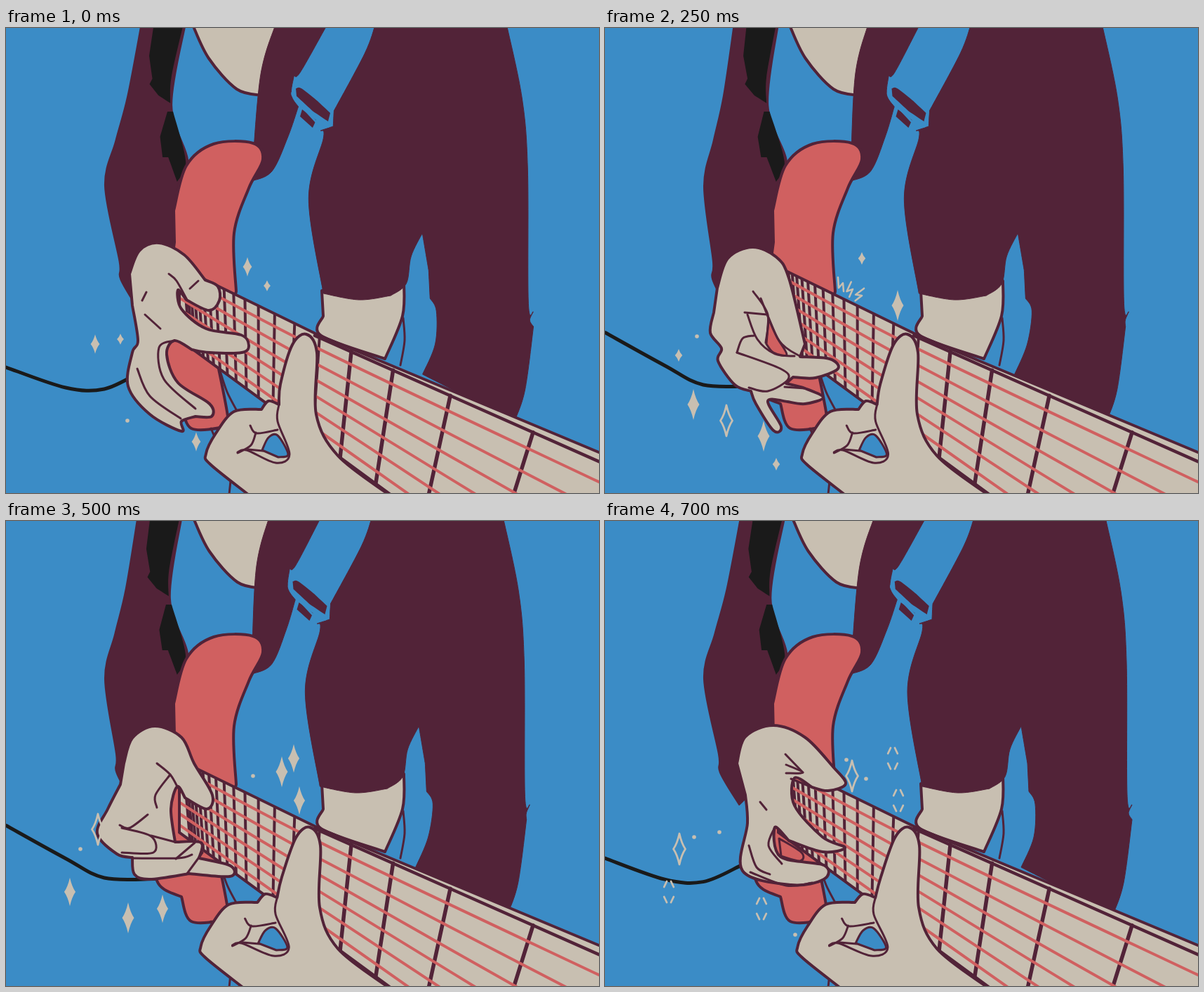
These frames come from a looping animation (845 px wide and 662 px high, 0.75 s). An HTML page with a canvas:

```html
<!DOCTYPE html>
<html lang="en">
<head>
<meta charset="utf-8">
<title>Guitar player</title>
<style>
html, body { margin: 0; width: 100%; height: 100%; overflow: hidden; background: #3b8cc6; }
canvas { display: block; }
</style>
</head>
<body>
<canvas id="stage" width="845" height="662"></canvas>
<script>
const ctx = document.getElementById('stage').getContext('2d');
const BLUE = '#3b8cc6', PLUM = '#522338', SKIN = '#c8bfb1', RED = '#d06060', INK = '#1a1a1a';
const STEP = 50, STEPS = 15;
let step = 0;

// One slow swing per loop around a middle value, highest at the given step
const wave = (mid, amp, peak = 0) => mid + amp * Math.cos((step - peak) / STEPS * 2 * Math.PI);
const points = s => s.trim().split(/\s+/).map(p => p.split(',').map(Number));

// Smooth curve through points; "/" makes the point before it a corner.
function curve(text, move = (x, y) => [x, y]) {
  const path = new Path2D();
  let last = null;
  for (const part of text.split('/')) {
    const run = points(part).map(p => move(...p));
    if (last) run.unshift(last);
    else path.moveTo(...run[0]);
    for (let i = 0; i < run.length - 1; i++) {
      const b = run[i], c = run[i + 1], a = run[i - 1] || b, d = run[i + 2] || c;
      path.bezierCurveTo(
        b[0] + (c[0] - a[0]) / 6, b[1] + (c[1] - a[1]) / 6,
        c[0] - (d[0] - b[0]) / 6, c[1] - (d[1] - b[1]) / 6, c[0], c[1]);
    }
    last = run[run.length - 1];
  }
  return path;
}
function line(text, width = 3, color = PLUM, move) {
  ctx.strokeStyle = color;
  ctx.lineWidth = width;
  ctx.stroke(curve(text, move));
}
function shape(text, fill, width = 0, move) {
  const path = curve(text, move);
  path.closePath();
  ctx.fillStyle = fill;
  ctx.fill(path);
  if (!width) return;
  ctx.strokeStyle = PLUM;
  ctx.lineWidth = width;
  ctx.stroke(path);
}

// Strumming hand poses: first step, outline, creases and gap between the fingers
const POSES = [
  { from: 0,
    out: '176,350 190,317 218,306 254,323 284,359 / 302,368 304,388 289,402 257,387 / 245,373 250,400 285,428 335,437 346,452 336,462 290,462 265,458 / 240,445 229,465 245,505 290,535 293,553 270,553 / 250,560 250,574 205,550 174,510 180,462 188,445 180,395',
    lines: ['232,350 243,360 258,387', '262,371 274,360', '194,388 200,376', '198,408 220,428', '187,485 205,524 249,556', '240,445 218,455 225,500 270,542'] },
  { from: 2,
    out: '176,350 191,318 225,309 260,318 295,353 / 316,358 314,378 290,386 262,374 / 249,376 262,425 310,447 331,463 303,478 / 335,491 350,516 305,525 / 258,515 295,553 285,563 250,538 213,465 185,410',
    lines: ['231,349 262,374', '238,382 248,388', '199,414 218,437', '218,452 250,472 303,478', '225,474 250,485 303,484', '236,505 280,522 305,525', '242,510 270,540'] },
  { from: 5,
    out: '160,370 175,328 210,312 244,326 262,356 285,450 / 278,468 / 320,471 332,485 300,498 268,497 / 258,506 / 285,513 311,526 285,535 260,532 / 232,531 251,567 240,573 215,535 208,517 / 185,508 161,474 166,456 150,434 155,405',
    gap: '233,412 245,440 259,465 240,462 230,450',
    lines: ['211,375 232,408 229,448', '222,385 248,445 279,468', '199,405 231,408', '203,408 217,443 242,464 270,467', '188,462 196,442 212,438', '188,462 250,485 261,500 232,517 205,512', '256,511 285,513'] },
  { from: 8,
    out: '172,340 183,310 212,299 245,316 260,355 275,432 268,451 246,440 / 234,457 290,470 318,474 291,496 / 286,503 318,511 310,526 258,515 / 271,550 262,558 240,520 207,489 / 175,496 140,476 144,445 168,380',
    gap: '241,447 266,469 242,464 236,457',
    lines: ['204,360 217,378', '204,374 229,394 247,442', '234,457 211,404 224,395 242,452', '176,457 195,438 206,428 226,440', '176,457 218,470 207,489', '207,489 250,502 291,496'] },
  { from: 10,
    out: '168,345 180,309 212,292 250,308 268,345 294,390 286,410 255,394 / 244,378 235,410 241,457 / 278,458 275,480 / 320,491 319,506 261,502 / 205,510 183,503 180,479 / 158,474 130,445 145,410 163,375',
    lines: ['215,345 234,361 245,380', '234,361 213,390 215,408', '202,418 176,437 162,433', '165,437 207,449 210,472 165,472', '207,448 241,457', '242,481 269,458', '180,480 245,480 265,475', '280,472 258,502'] },
  { from: 12,
    out: '170,345 185,308 225,288 265,305 319,360 308,380 270,370 / 248,350 232,397 227,447 / 238,455 279,453 279,473 240,501 185,505 168,475 171,453 / 155,425 168,375',
    lines: ['221,327 249,348 270,370', '221,332 225,360', '190,424 207,398', '162,414 200,442 239,458 220,477 171,453', '238,468 281,460', '239,458 258,455'] },
  { from: 14,
    out: '188,345 200,307 240,291 285,308 325,350 343,374 318,384 295,379 / 270,366 270,405 310,450 342,465 310,471 262,455 / 242,436 250,478 312,490 312,510 265,518 196,498 203,430 200,390',
    gap: '248,452 280,472 278,484 251,477',
    lines: ['257,332 282,358', '258,347 282,358 258,359', '265,367 295,379', '221,400 230,411', '242,436 233,462 252,488', '205,462 216,493 235,503', '207,500 258,519 295,515'] }
];
for (const p of POSES) p.crown = points(p.out.replaceAll('/', ' ')).reduce((a, b) => b[1] < a[1] ? b : a);

function drawPlayer() {
  const top = wave(-2, 5, 14), low = wave(2, 6, 14), sleeve = wave(-7, 6), hip = wave(0, 3.3);
  const belly = wave(3, 2.5, 12), strap = wave(-1, 3);
  const fade = (y, end) => Math.max(0, 1 - y / end);
  const arm = (x, y) => [x + top * fade(y, 200) + low * Math.max(0, (y - 250) / 110), y];
  const body = (x, y) => [x + hip * (y > 420 ? 2 : 1), y];
  const buckle = (x, y) => [x + strap, y];

  shape('262,-5 285,43 325,87 362,96 / 390,60 / 388,-5', SKIN, 4, (x, y) => [x + belly, y]);

  shape('190,-5 172,97 156,160 141,225 156,332 156,358 180,404 / 255,335 / 245,222 / 259,188 235,110 253,-5', PLUM, 2, arm);
  shape('208,-5 202,40 / 207,72 / 203,80 / 216,96 / 233,107 / 234,70 250,-5', INK, 0, arm);
  shape('229,119 219,155 / 223,184 / 231,184 / 244,219 / 256,190 237,119', INK, 0, arm);

  shape('385,-5 363,70 350,218 / 379,204 402,155 417,112 / 407,95 411,68 / 420,63 456,0', PLUM, 1,
    (x, y) => [x + sleeve * fade(y, 215), y]);

  shape('450,374 500,360 567,360 / 565,410 540,471 / 449,438 452,410', SKIN, 4);
  line('566,413 568,445 562,480');
  shape('523,-5 508,36 464,118 / 463,140 / 445,146 / 449,157 428,243 449,378 / 500,387 545,381 / 567,364 574,325 590,292 / 599,345 / 601,385 / 610,403 605,450 587,493 / 718,560 / 733,515 745,425 / 743,416 748,404 / 741,390 740,200 732,100 710,-5', PLUM, 1, body);
  shape('411,86 / 419,86 442,104 / 460,121 / 457,133 / 436,119 / 412,97', PLUM, 0, buckle);
  shape('420,116 / 440,131 / 435,142 / 417,126', PLUM, 0, buckle);
  line('409,88 406,95 418,110 / 443,137 / 458,140 463,119', 3, BLUE, buckle);
}

function drawCable() {
  const c = wave(0, 1);
  line(`0,${450 + 33 * c} 85,${491 + 21 * c} 140,${510 + 4 * c} ${205 - 14 * c},${503 - 13 * c}`, 5, INK);
}

// Neck edges: outer top, binding below it, and bottom
const NUT = 247;
const topY = x => 437 + (x - 445) * (x < 445 ? 0.487 : 0.418);
const rimY = x => x < 445 ? topY(x) : 440 + (x - 445) * 0.443;
const lowY = x => 442 + (x - 245) * 0.733;
// Frets crowd together with distance
const fretX = n => 100 + 1 / (0.001536 + 0.00034 * n - 1.9e-7 * n ** 3);

function drawGuitar() {
  shape('239,260 257,196 296,165 352,164 366,187 346,228 325,292 328,375 / 302,480 / 316,553 312,567 264,570 250,535 / 217,516 205,460 / 224,440 230,380 / 240,305', RED, 4);
  line('305,488 315,518 329,545');
  line('292,570 300,588');
  line('320,645 318,664');

  const neck = new Path2D();
  for (const x of [NUT, 445, 860]) neck.lineTo(x, topY(x));
  for (const x of [860, NUT]) neck.lineTo(x, lowY(x));
  neck.closePath();
  ctx.fillStyle = SKIN;
  ctx.fill(neck);
  ctx.save();
  ctx.clip(neck);
  for (let n = 0; n < 19; n++) {
    const x = fretX(n), y = rimY(x);
    line(`${x},${y} ${x - 0.0008 * (x - 360) * 200},${y + 200}`, n < 4 ? 5.5 : 4);
  }
  for (let i = 0; i < 6; i++) {
    const at = x => `${x},${rimY(x) + (lowY(x) - rimY(x)) * (0.11 + 0.157 * i)}`;
    line(`${at(NUT)} ${at(445)} ${at(850)}`, 4, RED);
  }
  ctx.restore();
  line(`440,438 850,${rimY(850)}`, 4.5);
  ctx.lineWidth = 4;
  ctx.stroke(neck);
}

function drawFretHand() {
  const fist = -0.75 * step, thumb = Math.min(5, step * 0.6);
  const move = (x, y) => [
    x + (x < 410 && y > 525 ? fist * Math.min(1, (410 - x) / 60) : y < 560 ? thumb * (x > 400 ? 1 : 0.4) : 0), y];
  const crease = s => line(s, 3, PLUM, move);
  shape('345,664 291,621 285,606 299,577 325,546 364,543 / 374,531 389,536 / 391,507 408,451 428,436 443,462 442,550 473,609 545,664', SKIN, 4, move);
  shape('365,601 374,583 387,580 402,607 388,611', BLUE, 3, move);
  crease('389,536 387,560 404,607 384,619 343,601 330,604');
  crease('348,566 357,577 387,572');
  crease('356,576 349,594 330,605');
  crease('345,600 366,602');
}

function drawHand() {
  const i = POSES.findLastIndex(p => step >= p.from);
  const a = POSES[i], b = POSES[(i + 1) % POSES.length];
  const t = (step - a.from) / ((b.from || STEPS) - a.from);
  const pose = t < 0.5 ? a : b;
  const shift = k => a.crown[k] + (b.crown[k] - a.crown[k]) * t - pose.crown[k];
  ctx.save();
  ctx.translate(shift(0), shift(1));
  shape(pose.out, SKIN, 4);
  if (pose.gap) shape(pose.gap, RED, 3);
  pose.lines.forEach(s => line(s));
  ctx.restore();
}

// Sparkles grouped by the step they are born in
const SPARKS = {
  13.05: '344,340 127,450 271,589',
  13.9: '372,367 163,443',
  14.8: '173,559',
  1.5: '417,395 126,536 226,581',
  3.7: '105,466 244,621 366,328',
  4.8: '131,439',
  6.5: '393,357 174,565',
  7.1: '410,338 418,398 91,528 223,552',
  9.05: '352,363 106,467'
};

// Dot, growing star, hollow star, then four loose flakes
function drawSpark(x, y, age) {
  const h = Math.min(22, 7 + (age - 1) * 7), w = 3 + h * 0.25, q = 0.36;
  ctx.fillStyle = ctx.strokeStyle = SKIN;
  ctx.lineWidth = 2.8;
  ctx.beginPath();
  if (age < 1) {
    ctx.arc(x, y, 2.8, 0, 7);
    ctx.fill();
  } else if (age < 5.9) {
    ctx.moveTo(x, y - h);
    for (const [sx, sy, down] of [[1, -1, 0], [1, 1, 1], [-1, 1, 0], [-1, -1, 1]]) {
      ctx.quadraticCurveTo(x + sx * w * q, y + sy * h * q, down ? x : x + sx * w, down ? y + sy * h : y);
    }
    ctx.closePath();
    if (age < 3.8) ctx.fill();
    else ctx.stroke();
  } else if (age > 6.7 && age < 6.92) {
    for (const sx of [-1, 1]) for (const sy of [-1, 1]) {
      ctx.moveTo(x + sx * w * 0.8, y + sy * 7);
      ctx.lineTo(x + sx * 3, y + sy * 15);
    }
    ctx.stroke();
  }
}

function drawSparks() {
  for (const [born, spots] of Object.entries(SPARKS)) {
    for (const [x, y] of points(spots)) drawSpark(x, y, (step - born + STEPS) % STEPS);
  }
  if (Math.abs(step - 5) > 1) return;
  for (let i = 0; i < 3; i++) {
    ctx.save();
    ctx.translate(336 + 13 * i, 366 + 7 * i);
    ctx.rotate(0.5 * i);
    line('-4,-11 / -3,4 / 3,-3 / 4,9', 2.5, SKIN);
    ctx.restore();
  }
}

let shown = -1;
function frame() {
  step = Math.floor(performance.now() / STEP) % STEPS;
  if (step !== shown) {
    shown = step;
    ctx.lineCap = ctx.lineJoin = 'round';
    ctx.fillStyle = BLUE;
    ctx.fillRect(0, 0, 845, 662);
    drawPlayer();
    drawCable();
    drawGuitar();
    drawFretHand();
    drawHand();
    drawSparks();
  }
  requestAnimationFrame(frame);
}
frame();
</script>
</body>
</html>
```
